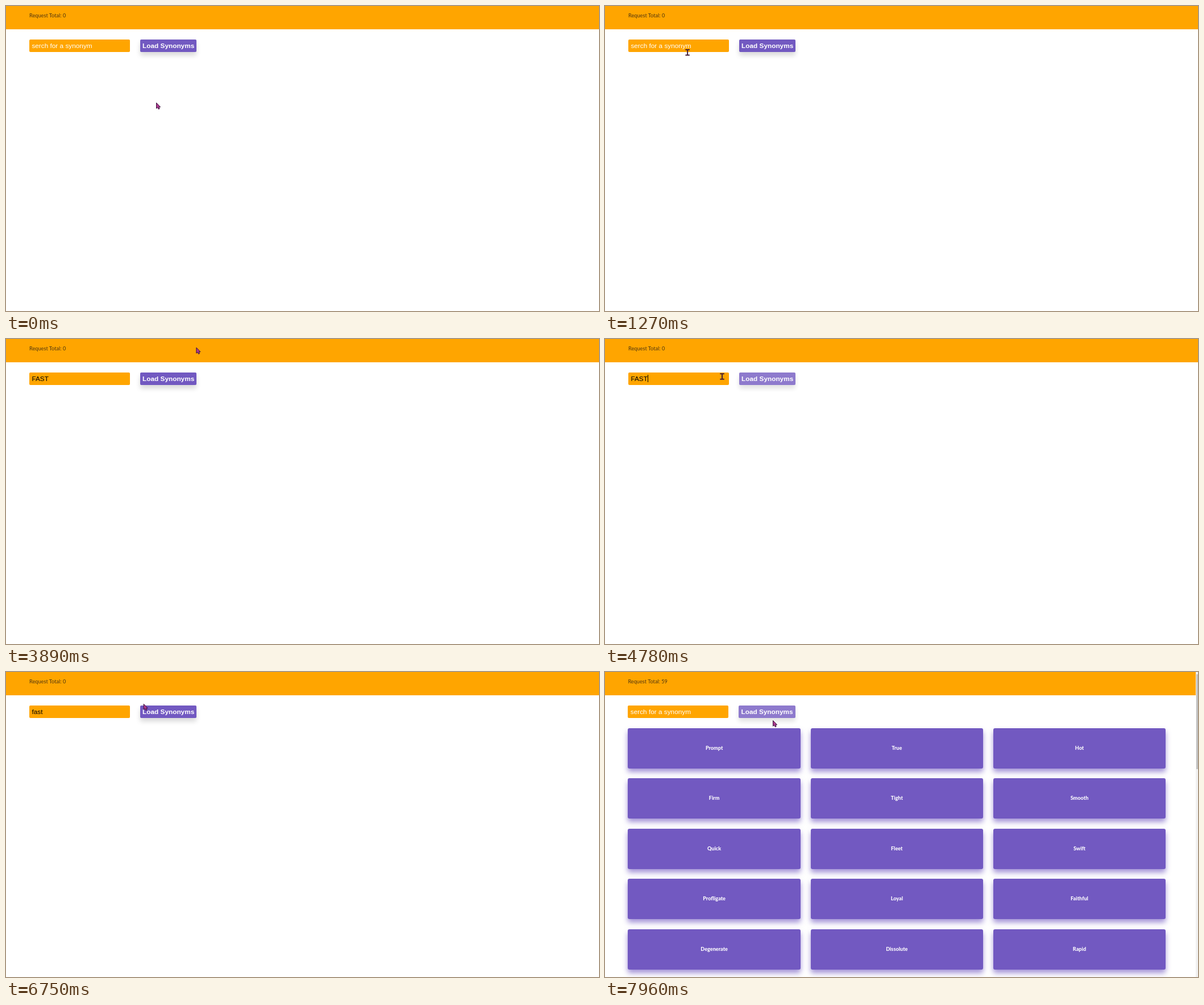
An HTML page for the animation above (8000 ms loop, 1043 by 537 pixels).

```html
<!DOCTYPE html>
<html lang="en">
<head>
<meta charset="utf-8">
<title>Synonym search</title>
<style>
  html, body { margin: 0; width: 100%; height: 100%; overflow: hidden; background: #fff; }
  #stage { position: relative; width: 1043px; height: 537px; overflow: hidden; font-family: Lato, sans-serif; }
  #stage > *, #page > *, .card { position: absolute; }
  #bar { left: 0; top: 0; width: 100%; height: 41px; background: #ffa500; }
  #page { left: 0; top: 0; }
  #total { left: 41px; top: 10px; font-size: 9.2px; line-height: 14px; color: #4d3510; white-space: nowrap; }
  #field, #button { top: 58.7px; height: 22.8px; line-height: 22.8px; font-size: 11.8px; border-radius: 2px;
    font-family: "Liberation Sans", Arial, sans-serif; white-space: pre; box-sizing: border-box; }
  #field { left: 41px; width: 177px; padding-left: 4.4px; background: #ffa500; color: #000; }
  #hint { color: #fff; }
  #chosen { background: #3390ff; color: #fff; }
  #caret { display: inline-block; width: 1px; height: 13px; margin-right: -1px; vertical-align: -2.5px; background: #000; }
  #button { left: 235.8px; width: 99.7px; text-align: center; font-weight: bold; color: #fff;
    background: #7259c1; box-shadow: 0 6px 9px rgba(0, 0, 0, .15); }
  .card { width: 303.4px; height: 70.8px; line-height: 70.8px; border-radius: 3px; text-align: center;
    font-size: 9.1px; font-weight: 800; color: #fff; background: #7259c1;
    box-shadow: 0 6px 10px rgba(114, 89, 193, .65); }
  #track { right: 0; top: 0; width: 4.5px; height: 100%; background: #f1f1f1; }
  #track::after { content: ""; position: absolute; left: 1px; top: 4px; width: 3px; height: 167px; background: #c1c1c1; }
  #pointer { left: 0; top: 0; overflow: visible; }
</style>
</head>
<body>
<div id="stage">
  <div id="bar"></div>
  <div id="page">
    <div id="total"></div>
    <div id="field"><span id="typed"></span><span id="chosen"></span><span id="caret"></span><span id="hint">serch for a synonym</span></div>
    <div id="button">Load Synonyms</div>
    <div id="cards"></div>
  </div>
  <div id="track"></div>
  <svg id="pointer" width="1" height="1">
    <g id="arrow" stroke="#35103a" stroke-linejoin="round">
      <path fill="#b03a90" d="M.5 .5V10.4L2.7 8.5 4.3 11.7 6.2 10.8 4.8 7.9H7.6Z"/>
    </g>
    <g id="beam" fill="none" stroke="#45203a" stroke-width="2">
      <path d="M-3.7-4.8H3.7M-3.7 4.8H3.7M0-4.8V4.8"/>
    </g>
    <g id="hand" stroke="#35103a" stroke-linejoin="round">
      <path fill="#f0189c" d="M-.8 1Q.2-.2 1.2 1V5L6 6Q7.6 6.6 7.4 8.4L6.6 11V13.4H.8L-2.6 9.4Q-2.6 7.8-.8 8.4Z"/>
    </g>
  </svg>
</div>
<script>
const LOOP = 8000;
const $ = id => document.getElementById(id);

// Stretches of screen updates: start, end, number of steps
const RUNS = [
  [0, 0, 1], [70, 70, 1], [290, 1060, 12], [1130, 1420, 5], [1560, 1560, 1],
  [3280, 4030, 10], [4100, 4850, 12], [4920, 4920, 1], [5060, 5260, 4], [5740, 5940, 3],
  [6210, 6950, 9], [7020, 7500, 7], [7960, 7960, 1]
];

// Pointer: time, x, y, shape
const PATH = [
  [0, 264, 170, "arrow"], [70, 199, 162, "arrow"], [290, 189, 166, "arrow"],
  [570, 152, 150, "arrow"], [850, 130, 122, "arrow"], [1060, 136, 106, "arrow"],
  [1130, 141, 93, "arrow"], [1200, 145, 82, "beam"], [1270, 148.3, 77, "beam"],
  [1420, 146, 73, "beam"], [1560, 149.7, 74, "beam"], [3280, 150, 73, "beam"],
  [3440, 198, 65, "beam"], [3525, 228, 48, "arrow"], [3610, 270, 25, "arrow"],
  [3775, 342, 1, "arrow"], [3860, 335, 14, "arrow"], [3945, 319, 32, "arrow"],
  [4030, 319, 44, "arrow"], [4100, 313, 60, "hand"], [4500, 240, 62, "hand"],
  [4570, 224, 65, "beam"], [4780, 197.7, 66.5, "beam"], [4850, 179, 66.5, "beam"],
  [4920, 130, 66, "beam"], [5060, 90, 64, "beam"], [5260, 51, 70, "beam"],
  [5740, 51, 70, "none"], [6210, 51, 70, "beam"], [6300, 24, 60, "arrow"],
  [6390, 36, 45, "arrow"], [6480, 90, 30, "arrow"], [6580, 170, 38, "arrow"],
  [6670, 240, 55, "arrow"], [6760, 300, 86, "arrow"], [6850, 332, 84, "arrow"],
  [6950, 300, 66, "hand"], [7020, 282, 60, "hand"], [7240, 276, 70, "hand"],
  [7500, 289, 80, "hand"], [7960, 295, 85, "arrow"]
];

// Field: time, plain text, selected text
const TYPING = [
  [0, "", ""], [2880, "FAS", ""], [3280, "FAST", ""],
  [5060, "FAS", "T"], [5127, "FA", "ST"], [5193, "F", "AST"], [5260, "", "FAST"],
  [5740, "f", ""], [5840, "fa", ""], [5940, "fas", ""], [6210, "fast", ""], [7960, "", ""]
];

const CARET = [[0, 0], [1710, 1], [2150, 0], [2880, 1], [3890, 0], [4390, 1],
  [4920, 0], [5740, 1], [6710, 0]];

// Button opacity
const GLOW = [[0, 1], [4100, 1], [4300, .8], [5000, .8], [5260, 1], [7020, 1], [7220, .8], [LOOP, .8]];

const WORDS = `Prompt True Hot Firm Tight Smooth Quick Fleet Swift Profligate Loyal
  Faithful Degenerate Dissolute Rapid`.split(/\s+/);
WORDS.forEach((word, i) => {
  const card = document.createElement("div");
  card.className = "card";
  card.textContent = word;
  card.style.left = 41 + i % 3 * 321.2 + "px";
  card.style.top = 99 + Math.floor(i / 3) * 88.45 + "px";
  $("cards").append(card);
});

const last = (table, t) => table.findLastIndex(row => row[0] <= t);

function snap(t) {
  const [start, end, count] = RUNS[last(RUNS, t)];
  if (t >= end) return end;
  const step = (end - start) / (count - 1);
  return start + Math.floor((t - start) / step + 1e-6) * step;
}

function between(table, t, column) {
  const i = last(table, t), a = table[i], b = table[i + 1];
  return b ? a[column] + (b[column] - a[column]) * (t - a[0]) / (b[0] - a[0]) : a[column];
}

function show(id, visible) {
  $(id).style.visibility = visible ? "visible" : "hidden";
}

function draw(t) {
  const now = snap(t), loaded = t >= 7960;
  const [, plain, chosen] = TYPING[last(TYPING, t)];
  $("typed").textContent = plain;
  $("chosen").textContent = chosen;
  $("hint").style.display = plain + chosen ? "none" : "";
  show("caret", CARET[last(CARET, t)][1]);
  $("button").style.opacity = between(GLOW, now, 1);

  $("total").textContent = "Request Total: " + (loaded ? 59 : 0);
  $("page").style.left = loaded ? "-.6px" : "0";
  show("cards", loaded);
  show("track", loaded);

  const shape = PATH[last(PATH, now)][3];
  for (const id of ["arrow", "beam", "hand"]) show(id, id === shape);
  $("pointer").style.transform = `translate(${between(PATH, now, 1)}px, ${between(PATH, now, 2)}px)`;
}

const begin = performance.now();
function tick() {
  draw((performance.now() - begin) % LOOP);
  requestAnimationFrame(tick);
}
tick();
</script>
</body>
</html>
```
